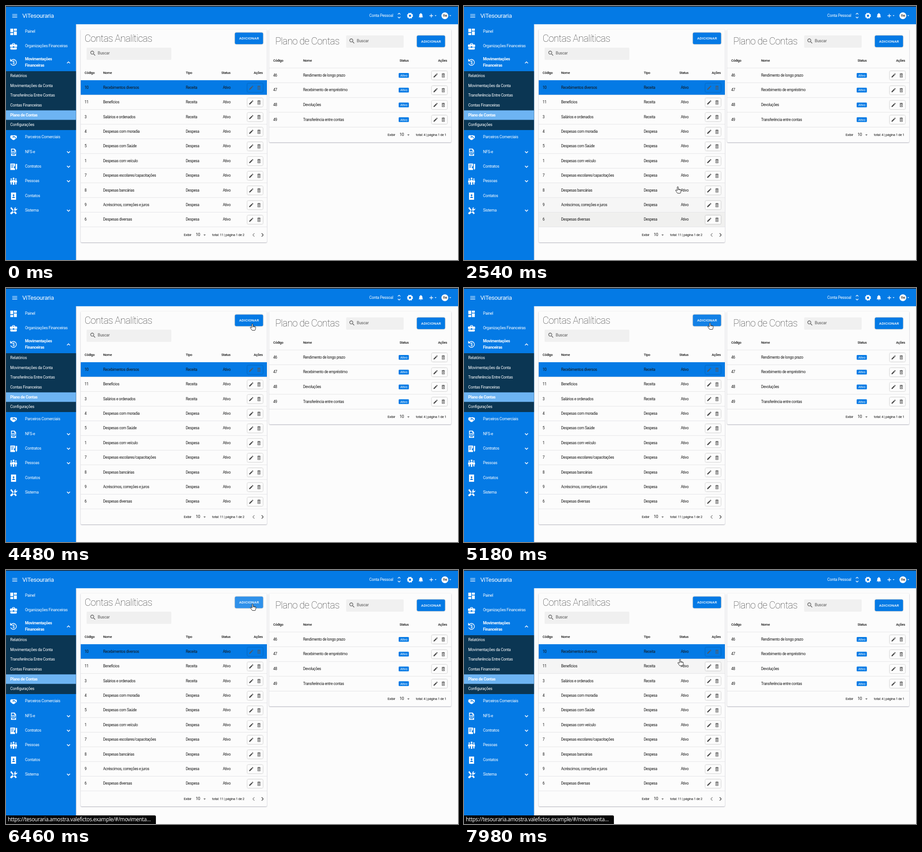
Write an HTML page that moves like this. It is 998 px wide and 561 px high and loops after 8000 ms.

```html
<!DOCTYPE html>
<html lang="pt-BR">
<head>
<meta charset="utf-8">
<title>Plano de Contas</title>
<style>
html, body { margin: 0; width: 100%; height: 100%; overflow: hidden; background: #fcfcfc; }
svg { display: block; width: 100vw; height: 100vh; font-family: Roboto, sans-serif; }
text { letter-spacing: -.033em; }
.button { letter-spacing: .02em; }
.card { filter: drop-shadow(0 1px 1.2px rgba(40, 40, 70, .38)); }
.soft { filter: drop-shadow(0 .8px .8px rgba(0, 0, 0, .4)); }
</style>
</head>
<body>
<svg id="stage" viewBox="0 0 998 561"></svg>
<script>
const BLUE = '#047ae5', PAPER = '#fcfcfc', INK = '#141414', LOOP = 8000;
const ROW_TOP = 163.9, ROW_H = 32.4;

const ICON = {
  edit: 'M3 17.25V21h3.75L17.81 9.94l-3.75-3.75L3 17.25zM20.71 7.04a1 1 0 000-1.41l-2.34-2.34a1 1 0 00-1.41 0l-1.83 1.83 3.75 3.75z',
  trash: 'M6 21h12V7H6zM19 4h-3.5l-1-1h-5l-1 1H5v2h14zM8 9h8v10H8zM9 11l2 3-2 3h2l1-2 1 2h2l-2-3 2-3h-2l-1 2-1-2z',
  search: 'M15.5 14h-.8l-.3-.3A6.5 6.5 0 109.5 16c1.6 0 3.1-.6 4.2-1.6l.3.3v.8l5 5 1.5-1.5zm-6 0a4.5 4.5 0 110-9 4.5 4.5 0 010 9z',
  menu: 'M3 18h18v-2H3zm0-5h18v-2H3zm0-7v2h18V6z',
  bell: 'M12 22a2 2 0 002-2h-4a2 2 0 002 2zm6-6v-5c0-3.1-1.6-5.6-4.5-6.3V4a1.5 1.5 0 00-3 0v.7C7.6 5.4 6 7.9 6 11v5l-2 2v1h16v-1z',
  panel: 'M3 13h8V3H3zm0 8h8v-6H3zm10 0h8V11h-8zm0-18v6h8V3z',
  bag: 'M10 16v-1H3v4a2 2 0 002 2h14a2 2 0 002-2v-4h-7v1zm10-9h-4V5l-2-2h-4L8 5v2H4a2 2 0 00-2 2v3a2 2 0 002 2h6v-2h4v2h6a2 2 0 002-2V9a2 2 0 00-2-2zm-6 0h-4V5h4z',
  hands: 'M3 8l4-2 4 1 3-1 7 2v6l-3 2-5 4-4-1-4-4-2-1zM10 9l-1 3 2 1 3-2 4 4 1-1-4-5z',
  file: 'M5 2h10l4 5v15H5zM7 4v5h10V8h-3V4zM6 11v6h12v-6zM8 18v2h8v-2zM7 12h1l2 3v-3h1v4h-1l-2-3v3H7zM13 12h4v1h-3v1h2v1h-2v1h-1z',
  pact: 'M3 3h13v6l-3 4v3h3v5H3zM5 6v1.5h8V6zm0 3.5V11h7V9.5zM5 13v1.5h6V13zM18 4h4v13l-2 4-2-4z',
  people: 'M3 9h5l1 6H7v6H4v-6H2zM9.5 8h5l1.5 7h-2v7h-4v-7H8zM16 9h5l1 6h-2v6h-3v-6h-2zM5.5 4a2 2 0 110 4 2 2 0 010-4zM12 2a2.5 2.5 0 110 5 2.5 2.5 0 010-5zM18.5 4a2 2 0 110 4 2 2 0 010-4z',
  book: 'M5 2h14v20H5zM12 7a2.5 2.5 0 100 5 2.5 2.5 0 000-5zM8 17h8c0-5-8-5-8 0z',
  tools: 'M3 5l3-3 5 7 3 2 7 8-3 3-8-8-2-3zM14 9l1-5 4-2-2 4 2 2 4-2-2 4-4 2L7 22l-4-1 0-3z'
};

const rect = (x, y, w, h, fill, extra = '') =>
  `<rect x="${x}" y="${y}" width="${w}" height="${h}" fill="${fill}" ${extra}/>`;
// y is the visual middle of the line
const text = (x, y, s, size = 8.2, fill = INK, weight = 400, extra = '') =>
  `<text x="${x}" y="${y + size * .34}" font-size="${size}" fill="${fill}" font-weight="${weight}" ${extra}>${s}</text>`;
const icon = (name, cx, cy, size, fill = '#fff') =>
  `<path fill-rule="evenodd" fill="${fill}" transform="translate(${cx - size / 2} ${cy - size / 2}) scale(${size / 24})" d="${ICON[name]}"/>`;
const stroke = (d, color, width = 1.3) =>
  `<path d="${d}" fill="none" stroke="${color}" stroke-width="${width}"/>`;
const chevron = (x, y, dir) => stroke(`M${x - 3.3} ${y - 1.7 * dir}l3.3 ${3.3 * dir} 3.3 ${-3.3 * dir}`, '#fff', 1.5);
const caret = (x, y, fill, r = 2.6) => `<path d="M${x - r} ${y - r / 2}h${2 * r}l${-r} ${r}z" fill="${fill}"/>`;
const line = (x, y, w) => rect(x, y - .4, w, .8, '#dedee2');

function actions(x, y, selected) {
  const color = selected ? '#4d5b6c' : '#4c4c4c';
  return rect(x, y - 9.5, 34, 19, selected ? BLUE : PAPER, 'rx="2.5" class="soft"') +
    icon('edit', x + 8.5, y, 12, color) + icon('trash', x + 25.5, y, 12, color);
}

function addButton(x, y, id) {
  return `<g class="soft">${rect(x, y, 62, 25.5, BLUE, 'rx="3"')}</g>` +
    rect(x, y, 62, 25.5, '#fff', `rx="3" opacity="0" id="${id}"`) +
    text(x + 31.2, y + 12.5, 'ADICIONAR', 8.1, '#fff', 500, 'text-anchor="middle" class="button"');
}

const searchBox = (x, y, w, iconX) =>
  rect(x, y, w, 27, '#f0f0f0', 'rx="2"') + icon('search', iconX, y + 12.5, 15, '#555') +
  text(iconX + 10.6, y + 12, 'Buscar', 9, '#555');

const headings = (y, list) => list.map(([x, s]) => text(x, y, s, 7.5, INK, 500)).join('');

const pager = (x, y, total, totalX) => text(x, y, 'Exibir', 7.5) +
  text(x + 26.5, y, '10', 9) + caret(x + 46, y + 1, '#555') + text(totalX, y, total, 7.5);

function topBar() {
  return rect(0, 0, 998, 40.3, BLUE) + rect(0, 0, 998, 1.6, '#23272c') +
    icon('menu', 19.3, 21.5, 14.5) + text(36, 21.3, 'ViTesouraria', 13.4, '#fff') +
    text(802, 20.7, 'Conta Pessoal', 8.8, '#fff') +
    stroke('M865.3 18.5l2.7-2.7 2.7 2.7M865.3 24l2.7 2.7 2.7-2.7', '#fff') +
    '<circle cx="892" cy="21.5" r="4" fill="none" stroke="#fff" stroke-width="3"/>' +
    '<circle cx="892" cy="21.5" r="5.8" fill="none" stroke="#fff" stroke-width="1.6" stroke-dasharray="2.6 1.955"/>' +
    icon('bell', 916, 21, 14) + stroke('M935 21.5h8M939 17.5v8', '#fff') + caret(948.5, 21.5, '#fff', 2) +
    '<circle cx="969" cy="21.5" r="7.6" fill="#fff"/>' +
    text(969, 21.5, 'TH', 7.2, '#222', 700, 'text-anchor="middle"') + caret(981, 21.5, '#fff', 2);
}

function sidebar() {
  const items = [
    ['panel', 56, 'Painel'], ['bag', 88, 'Organizações Financeiras'],
    ['hands', 289, 'Parceiros Comerciais'], ['file', 322, 'NFS-e', 1], ['pact', 354, 'Contratos', 1],
    ['people', 386, 'Pessoas', 1], ['book', 419, 'Contatos'], ['tools', 451, 'Sistema', 1]
  ];
  const sub = ['Relatórios', 'Movimentações da Conta', 'Transferência Entre Contas',
    'Contas Financeiras', 'Plano de Contas', 'Configurações'];
  return rect(0, 40, 154.5, 521, BLUE, 'class="card"') +
    items.map(([name, y, s, more]) => icon(name, 16.7, y + 1, 19) + text(42, y, s, 8.8, '#fff') +
      (more ? chevron(138, y + .8, 1) : '')).join('') +
    stroke('M11 121a6.5 6.5 0 1 1-.6 6M10 117v4.5h4.5', '#fff', 1.5) +
    text(16.8, 125, '$', 9, '#fff', 700, 'text-anchor="middle"') +
    text(42, 117, 'Movimentações', 8.8, '#fff', 700) + text(42, 131, 'Financeiras', 8.8, '#fff', 700) +
    chevron(138, 124.8, -1) +
    rect(0, 144, 154.5, 130, '#0b3653') + rect(0, 230.5, 154.5, 21, '#6db4f3') +
    sub.map((s, i) => text(9.3, 154 + 21.65 * i, s, 8.8, '#fff', i === 4 ? 700 : 400)).join('');
}

function analyticCard() {
  const rows = [[10, 'Recebimentos diversos'], [11, 'Benefícios'], [3, 'Salários e ordenados'],
    [4, 'Despesas com moradia'], [5, 'Despesas com Saúde'], [1, 'Despesas com veículo'],
    [7, 'Despesas escolares/capacitações'], [8, 'Despesas bancárias'],
    [9, 'Acréscimos, correções e juros'], [6, 'Despesas diversas']];
  return rect(165, 51.5, 411, 470.5, PAPER, 'rx="2" class="card"') +
    text(173.5, 72, 'Contas Analíticas', 21.6, '#333', 200) +
    addButton(505.5, 58.7, 'glow') + searchBox(178, 92, 187, 192) +
    headings(147.5, [[173.5, 'Código'], [214.5, 'Nome'], [397, 'Tipo'], [475.5, 'Status'], [547, 'Ações']]) +
    rows.map(([code, name], i) => {
      const top = ROW_TOP + ROW_H * i, y = top + ROW_H / 2 - .1;
      return rect(165, top, 411, ROW_H, i ? '#e8e8e6' : BLUE, i ? 'class="hover" opacity="0"' : '') +
        line(165, top + ROW_H, 411) + text(173.5, y, code) + text(214.5, y, name) +
        text(397, y, i < 3 ? 'Receita' : 'Despesa') + text(478.7, y, 'Ativo') + actions(533, y + .5, !i);
    }).join('') +
    pager(392.5, 505, 'total: 11 | página 1 de 2', 455) +
    stroke('M548.5 502l-3.5 3.7 3.5 3.7', '#777', 1.1) + stroke('M564.5 502l3.5 3.7-3.5 3.7', '#222', 1.1);
}

function planCard() {
  const rows = ['Rendimento de longo prazo', 'Recebimento de empréstimo', 'Devoluções', 'Transferência entre contas'];
  return rect(581, 51.5, 402, 249.5, PAPER, 'rx="2" class="card"') +
    text(594.5, 78, 'Plano de Contas', 21.6, '#333', 200) +
    searchBox(751, 65, 127, 764) + addButton(907.3, 65.3, 'glow2') +
    headings(120.5, [[590, 'Código'], [656, 'Nome'], [869, 'Status'], [954, 'Ações']]) + line(581, 137, 402) +
    rows.map((name, i) => {
      const y = 153 + 32.6 * i;
      return line(581, y + 16.6, 402) + text(590, y, 46 + i) + text(656, y, name) +
        rect(867, y - 5, 22.5, 10.5, BLUE, 'rx="1.5"') + text(870.5, y + .3, 'Ativo', 7.5, '#fff') +
        actions(940, y + .3);
    }).join('') +
    pager(842.5, 284, 'total: 4 | página 1 de 1', 905);
}

const overlay = `<g id="link"><path d="M0 542h328q3 0 3 3v16H0z" fill="#050505"/>
  ${text(4, 551.5, 'https://tesouraria.amostra.valefictos.example/#/movimenta…', 11.7, '#f6f6f6', 400, 'font-family="Noto Sans, sans-serif"')}</g>
  <g id="cursor" stroke-linejoin="round">
  <path id="arrow" d="M0 0v12l2.7-2.5 2 4.7 2-.9-2-4.5h3.7z" fill="#111" stroke="#fff" stroke-width=".8"/>
  <path id="hand" d="M-1.2 .8q1.2-1.6 2.4 0v4.4l5.2 1.3q1.2.4 1 1.8l-.7 3.7-1 2.5H-.6L-4.5 9q-.9-1.7.7-1.8l2.6 1.6z M1.2 5.2v2.3M3.3 5.7v2M5.4 6.3v1.7" fill="#fff" stroke="#111" stroke-width=".9"/></g>`;

const stage = document.getElementById('stage');
stage.innerHTML = analyticCard() + planCard() + sidebar() + topBar() + overlay;
const [link, cursor, arrow, hand, glow] =
  ['link', 'cursor', 'arrow', 'hand', 'glow'].map(id => document.getElementById(id));
const hovers = [...stage.querySelectorAll('.hover')];

// time, x, y of the pointer tip
const PATH = [[2200, 490, 508], [2300, 486, 481], [2440, 480, 456], [2500, 475, 424], [2540, 472, 399],
  [2640, 472, 399], [2780, 455, 330], [2800, 452, 322], [3000, 410, 228], [3100, 385, 165], [3200, 363, 57],
  [3520, 430, 62], [3620, 430, 62], [4360, 543, 81], [4460, 543, 81], [4480, 544, 79], [5200, 543, 77],
  [5300, 543, 77], [5720, 541, 75], [6140, 541, 75], [6880, 549, 75], [7560, 550, 75], [7720, 535, 104],
  [7820, 535, 104], [7900, 485, 207], [7980, 477, 197]];
const GLOW = [[4480, 0], [5720, .1], [6140, .1], [6880, .27], [7560, .27], [7900, 0]];

function at(keys, t) {
  const i = keys.findIndex(k => k[0] > t);
  if (i < 0) return keys[keys.length - 1].slice(1);
  if (i === 0) return keys[0].slice(1);
  const a = keys[i - 1], b = keys[i], p = (t - a[0]) / (b[0] - a[0]);
  return a.slice(1).map((v, n) => v + (b[n + 1] - v) * p);
}

function rowAt(t) {
  if (t < PATH[0][0]) return -1;
  const [x, y] = at(PATH, t), row = Math.floor((y - ROW_TOP) / ROW_H);
  return x > 165 && x < 576 && row >= 0 && row < 10 ? row : -1;
}

function draw(t) {
  const [x, y] = at(PATH, t);
  const onButton = x > 505 && x < 568 && y > 58 && y < 85;
  const pointing = onButton || rowAt(t) >= 0;
  cursor.setAttribute('transform', `translate(${x} ${y})`);
  cursor.style.display = t < PATH[0][0] ? 'none' : '';
  arrow.style.display = pointing ? 'none' : '';
  hand.style.display = pointing ? '' : 'none';
  link.style.display = t >= 5520 ? '' : 'none';
  glow.setAttribute('opacity', at(GLOW, t)[0]);
  // a row's tint is the share of the last 240 ms spent over it
  const fade = Array(10).fill(0);
  for (let k = 0; k < 24; k++) {
    const row = rowAt(t - k * 10);
    if (row >= 0) fade[row] += 1 / 24;
  }
  hovers.forEach((el, i) => el.setAttribute('opacity', fade[i + 1]));
}

const start = performance.now();
function tick() {
  draw((performance.now() - start) % LOOP);
  requestAnimationFrame(tick);
}
tick();
</script>
</body>
</html>
```
